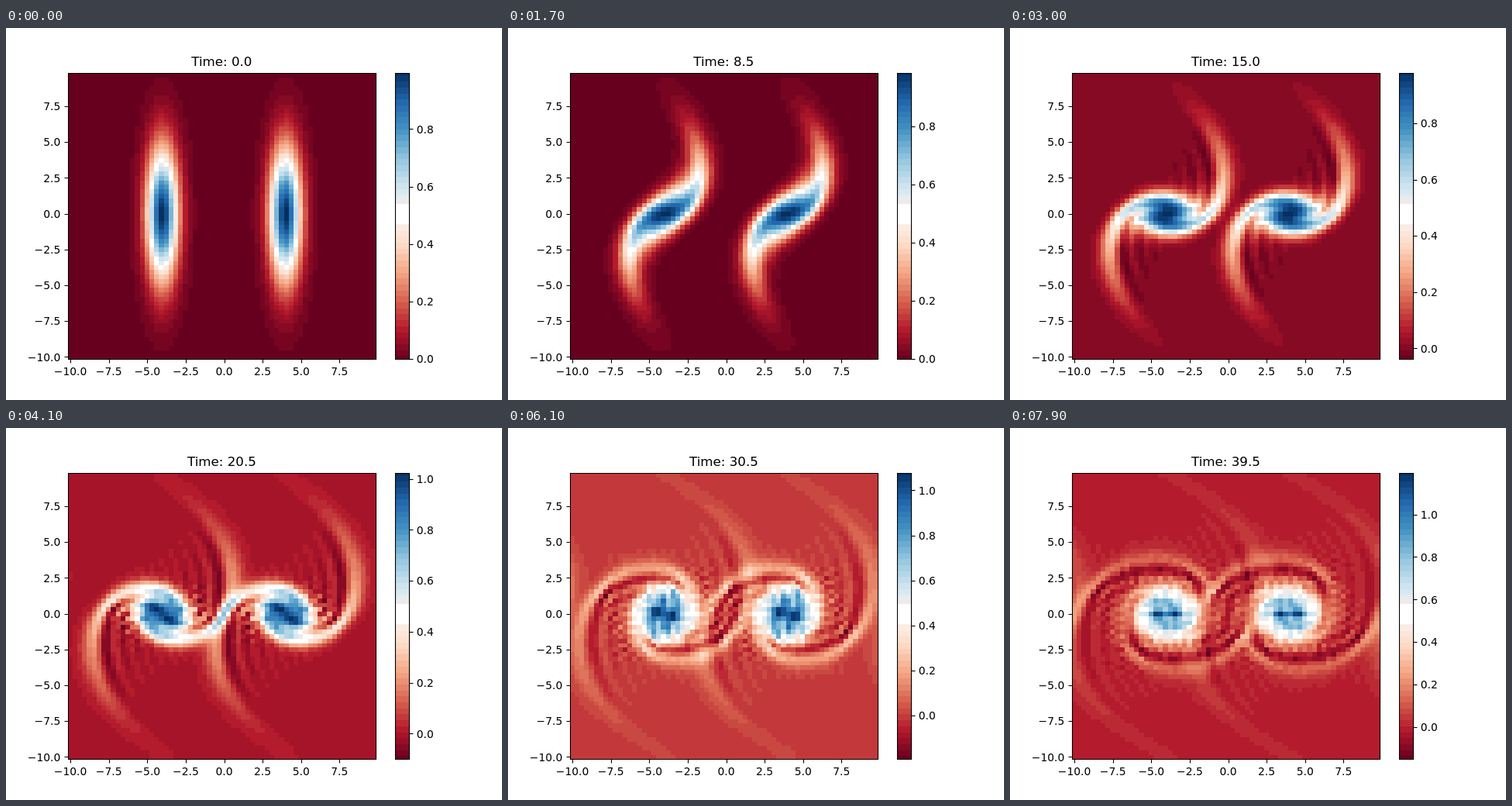
Write an HTML page with a canvas that moves like this. It is 640 by 480 pixels and loops after 8000 ms.

```html
<!DOCTYPE html>
<html lang="en">
<head>
<meta charset="utf-8">
<title>Vorticity</title>
<style>
  html, body { margin: 0; width: 100%; height: 100%; overflow: hidden; background: #fff; }
  canvas, svg { position: absolute; left: 0; top: 0; width: 640px; height: 480px; }
  text { font: 13.89px "DejaVu Sans", sans-serif; fill: #000; }
  #title { font-size: 16.67px; text-anchor: middle; }
  path { fill: none; stroke: #000; stroke-width: 1.1; }
</style>
</head>
<body>
<canvas id="field" width="640" height="480"></canvas>
<svg viewBox="0 0 640 480">
  <path d="M80.5 58.5H477.5V427.5H80.5ZM502.5 58.5H520.5V427.5H502.5Z"/>
  <g id="axes"></g>
  <g id="scale"></g>
  <text id="title" x="278.4" y="49"></text>
</svg>
<script>
const N = 64, CELLS = N * N, L = 20, H = L / N;
const VISCOSITY = 0.001, DT = 0.25, STEPS_PER_FRAME = 2, FRAMES = 80, FRAME_MS = 100;
const LEFT = 80, BOTTOM = 427.2, WIDTH = 396.8, HEIGHT = 369.6;
const $ = id => document.getElementById(id);

// --- Fourier transform, used to solve the Poisson equation ---
const BITS = Math.log2(N);
const reversed = Array.from({ length: N }, (_, i) => {
  let r = 0;
  for (let b = 0; b < BITS; b++) r |= (i >> b & 1) << (BITS - 1 - b);
  return r;
});
const cosT = Float64Array.from({ length: N }, (_, i) => Math.cos(2 * Math.PI * i / N));
const sinT = Float64Array.from({ length: N }, (_, i) => -Math.sin(2 * Math.PI * i / N));

function fft(re, im, start, stride) {
  for (let i = 0; i < N; i++) {
    const j = reversed[i];
    if (j > i) {
      const a = start + i * stride, b = start + j * stride;
      let t = re[a]; re[a] = re[b]; re[b] = t;
      t = im[a]; im[a] = im[b]; im[b] = t;
    }
  }
  for (let half = 1; half < N; half *= 2) {
    const turn = N / (2 * half);
    for (let k = 0; k < half; k++) {
      const c = cosT[k * turn], s = sinT[k * turn];
      for (let i = k; i < N; i += 2 * half) {
        const a = start + i * stride, b = a + half * stride;
        const x = re[b] * c - im[b] * s, y = re[b] * s + im[b] * c;
        re[b] = re[a] - x; im[b] = im[a] - y;
        re[a] += x; im[a] += y;
      }
    }
  }
}

function fft2(re, im) {
  for (let i = 0; i < N; i++) fft(re, im, i * N, 1);
  for (let i = 0; i < N; i++) fft(re, im, i, N);
}

const wave = i => 2 * Math.PI / L * (i < N / 2 ? i : i - N);
const inverseLaplace = Float64Array.from({ length: CELLS }, (_, p) =>
  p ? -1 / ((wave(p % N) ** 2 + wave(p / N | 0) ** 2) * CELLS) : 0);

const psi = new Float64Array(CELLS), imag = new Float64Array(CELLS);

function solveStream(w) {
  psi.set(w);
  imag.fill(0);
  fft2(psi, imag);
  for (let p = 0; p < CELLS; p++) {
    psi[p] *= inverseLaplace[p];
    imag[p] *= inverseLaplace[p];
  }
  fft2(imag, psi); // swapped arguments invert the transform
}

// --- Vorticity transport: central differences, clockwise flow ---
function rate(w, out) {
  solveStream(w);
  const adv = 1 / (4 * H * H), diff = VISCOSITY / (H * H);
  for (let j = 0; j < N; j++) {
    const row = j * N, up = (j + 1) % N * N, down = (j + N - 1) % N * N;
    for (let i = 0; i < N; i++) {
      const e = row + (i + 1) % N, o = row + (i + N - 1) % N;
      const n = up + i, s = down + i;
      out[row + i] =
        adv * ((psi[e] - psi[o]) * (w[n] - w[s]) - (psi[n] - psi[s]) * (w[e] - w[o])) +
        diff * (w[e] + w[o] + w[n] + w[s] - 4 * w[row + i]);
    }
  }
}

const slopes = [0, 1, 2, 3].map(() => new Float64Array(CELLS));
const trial = new Float64Array(CELLS);

function step(w) {
  const [a, b, c, d] = slopes;
  const shift = (k, h) => { for (let p = 0; p < CELLS; p++) trial[p] = w[p] + h * k[p]; };
  rate(w, a);
  shift(a, DT / 2); rate(trial, b);
  shift(b, DT / 2); rate(trial, c);
  shift(c, DT); rate(trial, d);
  for (let p = 0; p < CELLS; p++) w[p] += DT / 6 * (a[p] + 2 * b[p] + 2 * c[p] + d[p]);
}

// The second vortex is the first one turned half a circle about the origin.
function withTwin(w) {
  return Float64Array.from(w, (v, p) => {
    const i = (N - p % N) % N, j = (N - (p / N | 0)) % N;
    return v + w[j * N + i];
  });
}

function simulate() {
  const w = Float64Array.from({ length: CELLS }, (_, p) => {
    const x = p % N * H - L / 2, y = (p / N | 0) * H - L / 2;
    return Math.exp(-((x + 4) ** 2) - y * y / 20);
  });
  const frames = [];
  for (let f = 0; f < FRAMES; f++) {
    frames.push(withTwin(w));
    for (let s = 0; s < STEPS_PER_FRAME; s++) step(w);
  }
  return frames;
}

// --- Colours ---
const ramp = [0x67001f, 0xb2182b, 0xd6604d, 0xf4a582, 0xfddbc7, 0xf7f7f7,
  0xd1e5f0, 0x92c5de, 0x4393c3, 0x2166ac, 0x053061];
const LEVELS = 48;
const shades = Array.from({ length: LEVELS + 1 }, (_, n) => {
  const t = n / LEVELS * 10, k = Math.min(9, Math.floor(t));
  const mix = bits => {
    const a = ramp[k] >> bits & 255, b = ramp[k + 1] >> bits & 255;
    return Math.round(a + (b - a) * (t - k));
  };
  return `rgb(${mix(16)},${mix(8)},${mix(0)})`;
});

function shade(t) {
  if (t >= 0.471 && t < 0.543) return '#fff';
  if (t >= 0.543 && t < 0.566) return '#ebebeb';
  return shades[Math.round(t * LEVELS)];
}

// --- Drawing ---
const ctx = $('field').getContext('2d');
ctx.rect(LEFT, 58, 441, 370);
ctx.clip();

const edgeX = i => LEFT + i * WIDTH / N;
const edgeY = j => BOTTOM - j * HEIGHT / N;
const snap = v => Math.round(v) + 0.5;
const label = v => v.toFixed(1).replace('-', '\u2212');
const text = (x, y, anchor, v) =>
  `<text x="${x}" y="${Math.round(y)}" text-anchor="${anchor}">${label(v)}</text>`;
const beside = 5.28; // from a tick to the baseline of its label

// Fills every pixel the box touches.
function fillCell(x0, y0, x1, y1) {
  const x = Math.floor(x0), y = Math.floor(y0);
  ctx.fillRect(x, y, Math.ceil(x1) - x, Math.ceil(y1) - y);
}

function drawAxes() {
  let out = '';
  for (let v = -10; v <= 7.5; v += 2.5) {
    const part = (v + L / 2 + H / 2) / L;
    const x = LEFT + part * WIDTH, y = BOTTOM - part * HEIGHT;
    out += `<path d="M${snap(x)} 427.5v5M80.5 ${snap(y)}h-5"/>`;
    out += text(x, 448, 'middle', v) + text(70.3, y + beside, 'end', v);
  }
  $('axes').innerHTML = out;
}

function drawScale(min, max) {
  for (let y = 58; y < 427; y++) {
    ctx.fillStyle = shade((BOTTOM - y - 0.5) / HEIGHT);
    ctx.fillRect(502, y, 18, 1);
  }
  let out = '';
  for (let n = Math.ceil(min / 0.2 - 0.005); n * 0.2 <= max; n++) {
    const v = n ? n * 0.2 : 0;
    const y = BOTTOM - (v - min) / (max - min) * HEIGHT;
    out += `<path d="M520.5 ${snap(y)}h5"/>` + text(529.8, y + beside, 'start', v);
  }
  $('scale').innerHTML = out;
}

function draw(field, time) {
  let min = Infinity, max = -Infinity;
  for (const v of field) {
    if (v < min) min = v;
    if (v > max) max = v;
  }
  for (let j = 0; j < N; j++) {
    for (let i = 0; i < N; i++) {
      ctx.fillStyle = shade((field[j * N + i] - min) / (max - min));
      fillCell(edgeX(i), edgeY(j + 1), edgeX(i + 1), edgeY(j));
    }
  }
  drawScale(min, max);
  $('title').textContent = 'Time: ' + time.toFixed(1);
}

const frames = simulate();
let start, shown = -1;

function show(f) {
  if (f === shown) return;
  shown = f;
  draw(frames[f], f * STEPS_PER_FRAME * DT);
}

function tick(now) {
  start ??= now;
  show(Math.floor((now - start) / FRAME_MS) % FRAMES);
  requestAnimationFrame(tick);
}

drawAxes();
show(0);
requestAnimationFrame(tick);
</script>
</body>
</html>
```
